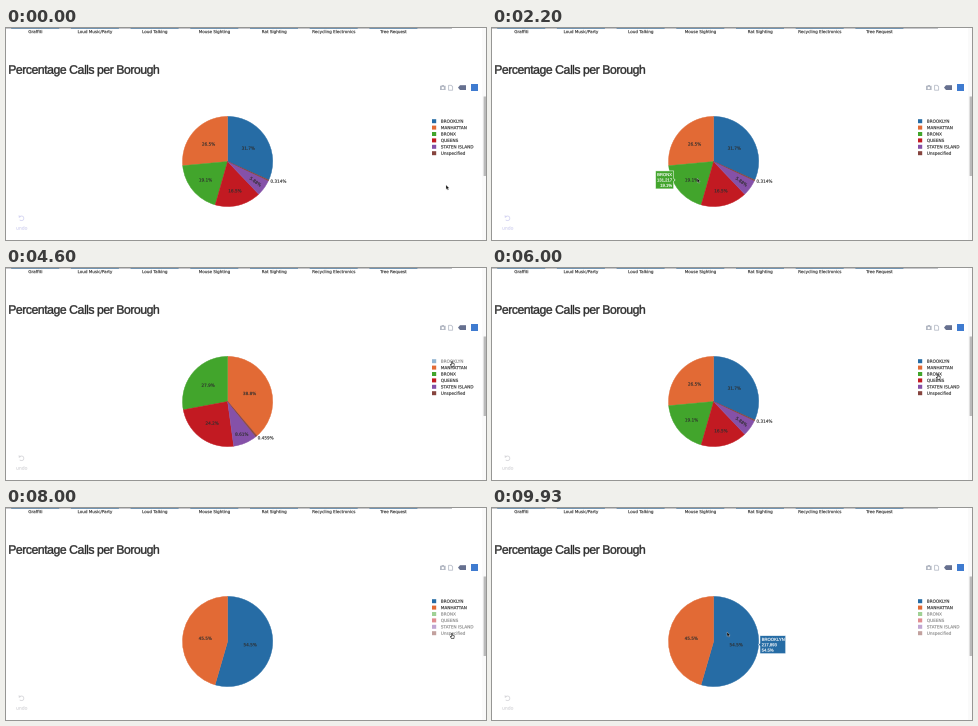
Write a matplotlib script that moves like this. It is 480x212 px and loops after 9990 ms.

```python
import matplotlib.pyplot as plt
import numpy as np
from matplotlib.animation import FuncAnimation
from matplotlib.patches import Arc, Circle, PathPatch, Polygon, Rectangle, Wedge
from matplotlib.textpath import TextPath
from matplotlib.transforms import Affine2D

W, H, DPI = 480, 212, 100
FRAMES, INTERVAL = 333, 30
STEPS_PER_SEC = 15
CX, CY, R = 221.6, 133.5, 45.1
INK = "#2e2e2e"

BOROUGHS = [("BROOKLYN", 217893, "#266ca5"), ("MANHATTAN", 182000, "#e26a35"),
            ("BRONX", 131217, "#42a52c"), ("QUEENS", 113700, "#c21a22"),
            ("STATEN ISLAND", 40400, "#8551a8"), ("Unspecified", 2156, "#86443e")]
NAMES, CALLS, COLORS = zip(*BOROUGHS)
BROOKLYN, MANHATTAN, BRONX, QUEENS, STATEN, UNSPECIFIED = range(6)
TOPICS = ["Graffiti", "Loud Music/Party", "Loud Talking", "Mouse Sighting",
          "Rat Sighting", "Recycling Electronics", "Tree Request"]

fig = plt.figure(figsize=(W / DPI, H / DPI), dpi=DPI, facecolor="white")
ax = fig.add_axes([0, 0, 1, 1])
ax.set_xlim(0, W)
ax.set_ylim(H, 0)
ax.axis("off")


def pt(px):
    return px * 72 / DPI


def label(x, y, s, size=4.2, color=INK, align=0, tilt=0,
          font="DejaVu Sans", zorder=3):
    """Outlined text with its capitals centred on y; align runs from 0 to 1."""
    path = TextPath((0, 0), s, size=size, prop={"family": font})
    shift = -align * path.get_extents().x1
    place = (Affine2D().translate(shift, -0.365 * size).scale(1, -1)
             .rotate_deg(tilt).translate(x, y))
    return ax.add_patch(PathPatch(place.transform_path(path), facecolor=color,
                                  edgecolor=color, lw=pt(0.03 * size),
                                  zorder=zorder))


def spaced_label(x, y, s, size, spacing, font):
    """Text with letter spacing on top of the natural advances."""
    def right(part):
        return TextPath((0, 0), part, size=size, prop={"family": font}).get_extents().x1

    for k, c in enumerate(s):
        if c != " ":
            label(x + right(s[:k + 1]) - right(c) + k * spacing, y, c, size, font=font)


def rect(x, y, w, h, color):
    return ax.add_patch(Rectangle((x, y), w, h, facecolor=color, lw=0, snap=False))


def polar(deg, radius):
    """Point at an angle clockwise from twelve o'clock."""
    a = np.radians(deg)
    return CX + radius * np.sin(a), CY - radius * np.cos(a)


def slices(hidden=()):
    """Largest slice runs clockwise from the top, the others counterclockwise."""
    shown = sorted((i for i in range(len(NAMES)) if i not in hidden),
                   key=lambda i: -CALLS[i])
    total = sum(CALLS[i] for i in shown)
    spans = [360 * CALLS[i] / total for i in shown]
    ends = [spans[0], *(360 - np.cumsum([0, *spans[1:-1]]))]
    return [(i, end - span, end) for i, span, end in zip(shown, spans, ends)]


def row_y(i):
    return 93.2 + 6.4 * i


def on_slice(i):
    a0, a1 = next(part[1:] for part in slices() if part[0] == i)
    return polar((a0 + a1) / 2, 0.55 * R)


def on_row(i):
    return 445.5, row_y(i) + 0.3


# pointer moves: start ms, end ms, goal
MOVES = [(0, 400, on_slice(BROOKLYN)), (600, 1130, on_slice(MANHATTAN)),
         (1465, 1800, on_slice(BRONX)), (2150, 2400, on_slice(QUEENS)),
         (2530, 2930, on_slice(STATEN)), (3265, 3530, on_row(MANHATTAN)),
         (3670, 4200, on_row(BROOKLYN)), (5600, 6000, on_row(BRONX)),
         (6600, 6800, on_row(QUEENS)), (7065, 7400, on_row(STATEN)),
         (7600, 7730, on_row(UNSPECIFIED)), (8270, 8750, (126, 112)),
         (8750, 9130, (200, 146)), (9535, 9930, (235, 124))]
CLICKS = {4590: BROOKLYN, 5390: BROOKLYN, 6390: BRONX,
          6860: QUEENS, 7450: STATEN, 7920: UNSPECIFIED}


def pointer(t):
    pos = np.array([440.0, 157.0])
    for start, end, goal in MOVES:
        u = np.clip((t - start) / (end - start), 0, 1)
        pos += (np.array(goal) - pos) * u * u * (3 - 2 * u)
    return pos


def hidden_at(t):
    off = set()
    for when, i in CLICKS.items():
        if t >= when:
            off ^= {i}
    return off


def inscribed(span):
    """Relative radius of the largest circle that fits a slice."""
    return min(1 / (1 + 1 / np.sin(np.radians(span / 2))), 0.5)


def slice_at(parts, x, y):
    dx, dy = x - CX, y - CY
    if np.hypot(dx, dy) > R:
        return None
    a = np.degrees(np.arctan2(dx, -dy)) % 360
    return next((i for i, a0, a1 in parts if a0 <= a < a1), None)


def percent(span):
    return f"{span / 3.6:.3g}%"


def draw_slice(i, a0, a1):
    span, mid = a1 - a0, (a0 + a1) / 2
    wedge = ax.add_patch(Wedge((CX, CY), R, a0 - 90, a1 - 90, facecolor=COLORS[i],
                               edgecolor=COLORS[i], lw=pt(0.4)))
    align, tilt = 0.5, 0
    if span < 7:
        radius, align = 1.045, 0 if mid < 180 else 1
    elif span < 26:
        radius, tilt = 0.76, mid - 90 if mid < 180 else mid - 270
    else:
        radius = 1 - inscribed(span)
    text = label(*polar(mid, R * radius), percent(span), align=align, tilt=tilt)
    return [wedge, text]


def draw_hover(i, a0, a1):
    span, mid = a1 - a0, (a0 + a1) / 2
    r_in = inscribed(span)
    x, y = polar(mid, R * (1 - r_in))
    side = 1 if mid < 180 else -1
    x += side * r_in * R
    lines = [NAMES[i], f"{CALLS[i]:,}", percent(span)]
    texts = [label(x + side * 3.2, y + (k - 1) * 5.4, s, color="white", zorder=6,
                   align=0 if side > 0 else 1, font="Liberation Sans")
             for k, s in enumerate(lines)]
    width = max(t.get_path().get_extents().width for t in texts) + 3.4
    near, far = x + side * 1.5, x + side * (1.5 + width)
    box = Polygon([(x, y), (near, y - 1.5), (near, y - 9), (far, y - 9),
                   (far, y + 9), (near, y + 9), (near, y + 1.5)], snap=False,
                  facecolor=COLORS[i], edgecolor="white", lw=pt(0.5), zorder=5)
    return texts + [ax.add_patch(box)]


def draw_page():
    rect(0, 0, 446, 0.5, "#8a8f96")
    for k, s in enumerate(TOPICS):
        x = 29.2 + 59.7 * k
        rect(x - 24, 0, 48, 0.7, "#4f7fa8")
        label(x, 3.6, s, size=4.1, align=0.5)
    spaced_label(2.2, 41.3, "Percentage Calls per Borough", 12.2, -0.44,
                 "Liberation Sans")

    rect(476, 0, 4, H, "#fafafa")
    rect(477.6, 68.5, 2.4, 79.5, "#bababa")

    # chart toolbar
    rect(434, 57.8, 5.6, 4.2, "#b4b9c4")
    rect(435.6, 57, 2.4, 1, "#b4b9c4")
    ax.add_patch(Circle((436.8, 60), 1.2, color="white", lw=0))
    ax.add_patch(Polygon([(442.6, 57.3), (445.2, 57.3), (446.6, 58.7),
                          (446.6, 62.2), (442.6, 62.2)], snap=False,
                         facecolor="none", edgecolor="#bcc1cc", lw=pt(0.9)))
    ax.add_patch(Polygon([(452, 59.6), (454, 57.2), (460, 57.2), (460, 62),
                          (454, 62)], facecolor="#66708f", lw=0, snap=False))
    rect(465, 56, 7, 7, "#3f7bd0")


def make_undo():
    arc = ax.add_patch(Arc((15.5, 190.3), 4.6, 4.6, theta1=-130, theta2=140,
                           lw=pt(0.8)))
    head = ax.add_patch(Polygon([(12.6, 187.2), (12.9, 190), (15.2, 188.6)], lw=0))
    return arc, head, label(15.6, 200, "undo", size=4.5, align=0.5)


def make_legend():
    return [(rect(426, row_y(i) - 2, 4.2, 4, COLORS[i]), label(434.8, row_y(i), name))
            for i, name in enumerate(NAMES)]


ARROW = np.array([(0, 0), (0, 4.4), (1.05, 3.5), (1.8, 5.1), (2.6, 4.7),
                  (1.9, 3.2), (3.2, 3.1)])
HAND = np.array([(0, 0), (0.8, 0), (0.9, 1.8), (2.8, 2.3), (2.4, 5), (0, 5),
                 (-1.3, 2.9), (0, 3.1)])

draw_page()
undo = make_undo()
legend = make_legend()
cursor = ax.add_patch(Polygon(ARROW, zorder=9, snap=False))
scene = {"key": None, "items": []}


def draw_pie(hidden, hover, parts):
    for item in scene["items"]:
        item.remove()
    items = []
    for part in parts:
        items += draw_slice(*part)
        if part[0] == hover:
            items += draw_hover(*part)
    scene["items"] = items
    for i, row in enumerate(legend):
        for artist in row:
            artist.set_alpha(0.5 if i in hidden else 1)


def update(n):
    t = (n * INTERVAL + 20) * STEPS_PER_SEC // 1000 * 1000 / STEPS_PER_SEC
    x, y = pointer(t)
    hidden = hidden_at(t)
    parts = slices(hidden)
    hover = slice_at(parts, x, y)

    key = (frozenset(hidden), hover)
    if key != scene["key"]:
        draw_pie(hidden, hover, parts)
        scene["key"] = key

    tint = "#d4d4f2" if t < 3930 else "#d6d6da"
    for artist in undo:
        artist.set_edgecolor(tint)
    for artist in undo[1:]:
        artist.set_facecolor(tint)

    on_legend = x > 424 and 88 < y < 129
    cursor.set_xy((HAND if on_legend else ARROW) + (x, y))
    cursor.set_facecolor("#f4f4f4" if on_legend else "#111111")
    cursor.set_edgecolor("#222222" if on_legend else "#d0d0d0")
    cursor.set_linewidth(pt(0.6 if on_legend else 0.3))
    return [cursor]


anim = FuncAnimation(fig, update, frames=FRAMES, interval=INTERVAL,
                     repeat=True, repeat_delay=0, blit=False)
plt.show()
```
